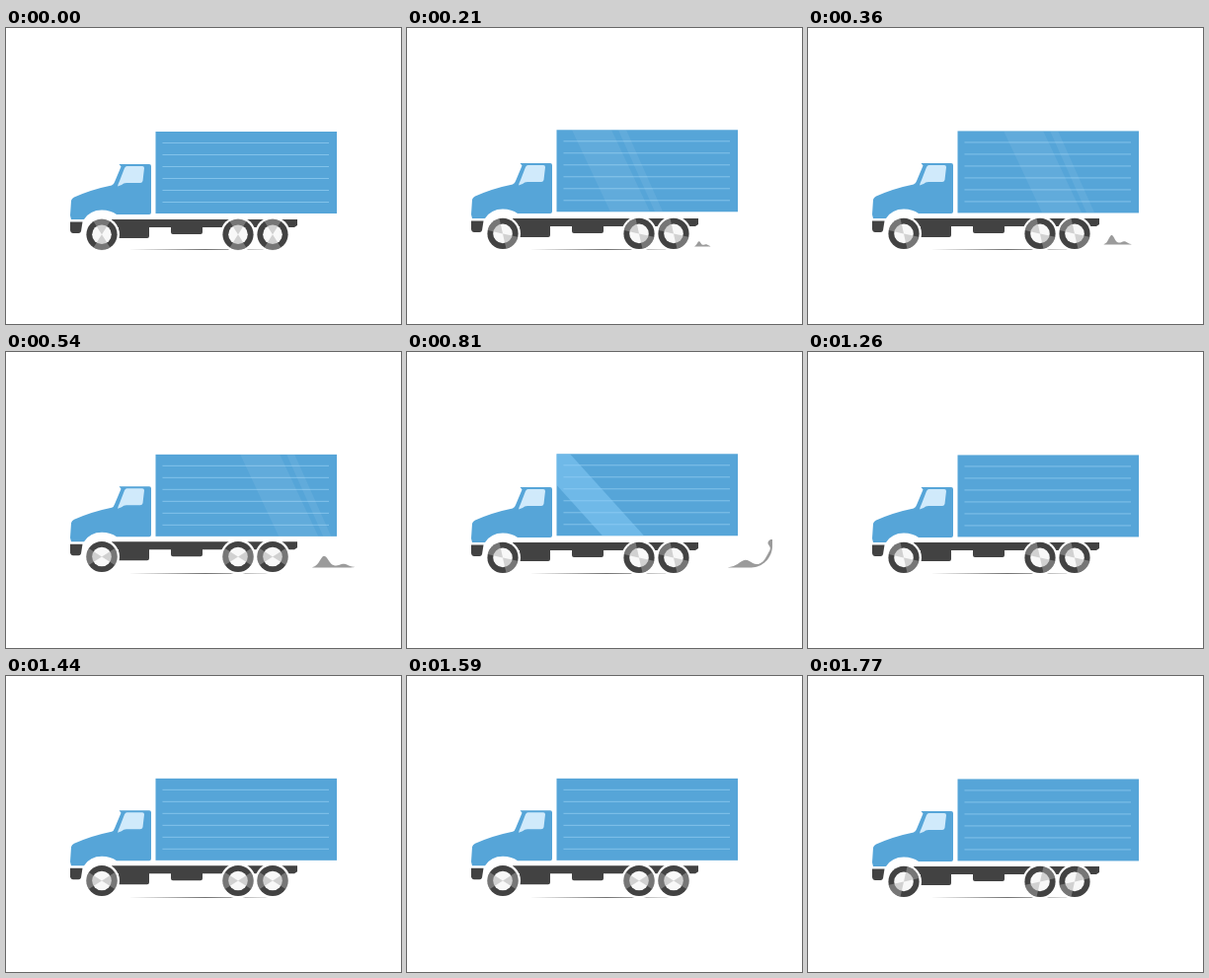
An HTML page for the animation above (1800 ms loop, 400 by 300 pixels).

```html
<!DOCTYPE html>
<html lang="en">
<head>
<meta charset="utf-8">
<title>Delivery truck</title>
<style>
  html, body { margin: 0; width: 100%; height: 100%; overflow: hidden; background: #fff; }
  svg { display: block; width: 100vw; height: 100vh; }
</style>
</head>
<body>
<svg viewBox="0 0 400 300">
  <defs>
    <clipPath id="boxClip"><rect x="151.5" y="105" width="183.5" height="83"/></clipPath>
    <g id="wheel">
      <circle r="15.6" fill="#424242"/>
      <circle r="9.8" fill="#f8f8f8"/>
      <path d="M0 0L-8.4-13.2A15.6 15.6 0 0 1 8.4-13.2ZL8.4 13.2A15.6 15.6 0 0 1-8.4 13.2Z" fill="#aaa" opacity=".5"/>
    </g>
  </defs>

  <path d="M124 224.3Q202 223.5 280 224.3Q202 225.2 124 224.3Z" fill="#444"/>
  <path id="smoke" fill="#9b9b9b"/>

  <g id="cab">
    <path d="M107 194H295V200L292 202H199V207Q199 209 197 209H169Q167 209 167 207V202H145V211Q145 213 143 213H114V202H107Z" fill="#424242"/>
    <path d="M65 196.5H77.5L76 206Q75.5 208 73.5 208H68Q65.5 208 65 205Z" fill="#424242"/>
    <path d="M114.5 138H145Q147 138 147 140V187Q147 189 145 189H112Q106 184.5 97 184.5Q85 184.5 79 194H66L65 190L66 175Q66.5 172.5 69 171.5Q87 163.5 107 159.5Q109 159 110 156L116.5 140.5Z" fill="#56a5d8"/>
    <path d="M122.5 140H138Q140 140 140 142L138.5 155Q138 157 136 157H122Q119 157 117 159L113 160.5Q113.5 158 115 155L120 142Q121 140 122.5 140Z" fill="#d0eafb"/>
    <g id="wheels"></g>
  </g>

  <g id="box">
    <rect x="151.5" y="105" width="183.5" height="83" fill="#56a5d8"/>
    <path id="ribs" stroke="#82c2ea"/>
    <g clip-path="url(#boxClip)">
      <path id="doubleSheen" fill="#fff"/>
      <path id="wideSheen" fill="#8ed0fa"/>
    </g>
  </g>
</svg>
<script>
const $ = id => document.getElementById(id);
const LOOP = 1800, BEAT = 150, STEP = 30;
const clamp = v => Math.max(0, Math.min(1, v));
const bell = (s, center, width) => Math.exp(-(((s - center) / width) ** 2));

$('ribs').setAttribute('d', [0, 1, 2, 3, 4, 5].map(i => `M158.5 ${116.5 + i * 12}H327`).join(''));
$('wheels').innerHTML = [97, 235, 270].map(x =>
  `<g transform="translate(${x} 209.3)"><circle r="18" fill="#fff"/><use href="#wheel"/></g>`).join('');
const spinners = document.querySelectorAll('#wheels use');

// The exhaust runs along the ground, then curls up a quarter circle.
function trailPoint(distance, lift, ground) {
  const flat = 62, radius = 22;
  const angle = Math.max(0, Math.min(Math.PI / 2, (distance - flat) / radius));
  const rise = Math.max(0, distance - flat - radius * Math.PI / 2);
  const x = 286 + Math.min(distance, flat) + (radius - lift) * Math.sin(angle);
  const y = ground - radius + (radius - lift) * Math.cos(angle) - rise;
  return `${x.toFixed(2)} ${y.toFixed(2)}`;
}

function smokePath(k) {
  if (k < 3 || k > 25) return '';
  const tail = Math.max(0, 2.1 * k - 5.5), head = 5.1 * (k - 0.8);
  const height = 12 * Math.sin(Math.PI * (k - 2) / 24);
  const ground = 218.5 + 3 * clamp((11 - k) / 6);
  const curl = 4 * clamp((k - 14) / 7);
  const fade = clamp((26 - k) / 4);
  const bottom = [], top = [], count = 32;
  for (let i = 0; i <= count; i++) {
    const s = i / count, distance = Math.min(106, tail + (head - tail) * s);
    const puff = height * (bell(s, 0.27, 0.14) + 0.25 * bell(s, 0.75, 0.13));
    const lift = fade * Math.sqrt(Math.sin(Math.PI * s) + 1e-6) * (1.5 + puff)
      + fade * curl * bell(s, 0.95, 0.06);
    bottom.push(trailPoint(distance, 0, ground));
    top.unshift(trailPoint(distance, lift, ground));
  }
  return `M${[...bottom, ...top].join('L')}Z`;
}

const band = (x, width, slant) =>
  `M${x} 105h${width}l${slant} 83h${-width}Z`;

function drawSheens(k) {
  const x = 167 + 7.8 * (k - 5);
  $('doubleSheen').setAttribute('d', band(x, 40, 39) + band(x + 47, 8, 37));
  $('doubleSheen').setAttribute('opacity', 0.065 * clamp(k / 4) * clamp((18 - k) / 4));
  $('wideSheen').setAttribute('d', band(123 + 22 * (k - 21), 42, 75));
  $('wideSheen').setAttribute('opacity', 0.45 * clamp((k - 17) / 3) * clamp((26 - k) / 4));
}

function draw(time) {
  const t = time % LOOP;
  // Four poses per beat, the first held for two steps.
  const k = Math.floor(t / BEAT) * 4 + Math.max(0, Math.floor(t % BEAT / STEP) - 1);
  const cabY = 0.9 * (Math.cos(k * Math.PI / 2) - 1);
  const boxY = -2.3 * (1 - Math.abs(k % 8 - 4) / 4);
  $('cab').setAttribute('transform', `translate(0 ${cabY})`);
  $('box').setAttribute('transform', `translate(0 ${boxY})`);
  spinners.forEach(w => w.setAttribute('transform', `rotate(${-45 * k})`));
  $('smoke').setAttribute('d', smokePath(k));
  drawSheens(k);
}

let begin;
function tick(now) {
  begin ??= now;
  draw(now - begin);
  requestAnimationFrame(tick);
}
draw(0);
requestAnimationFrame(tick);
</script>
</body>
</html>
```
